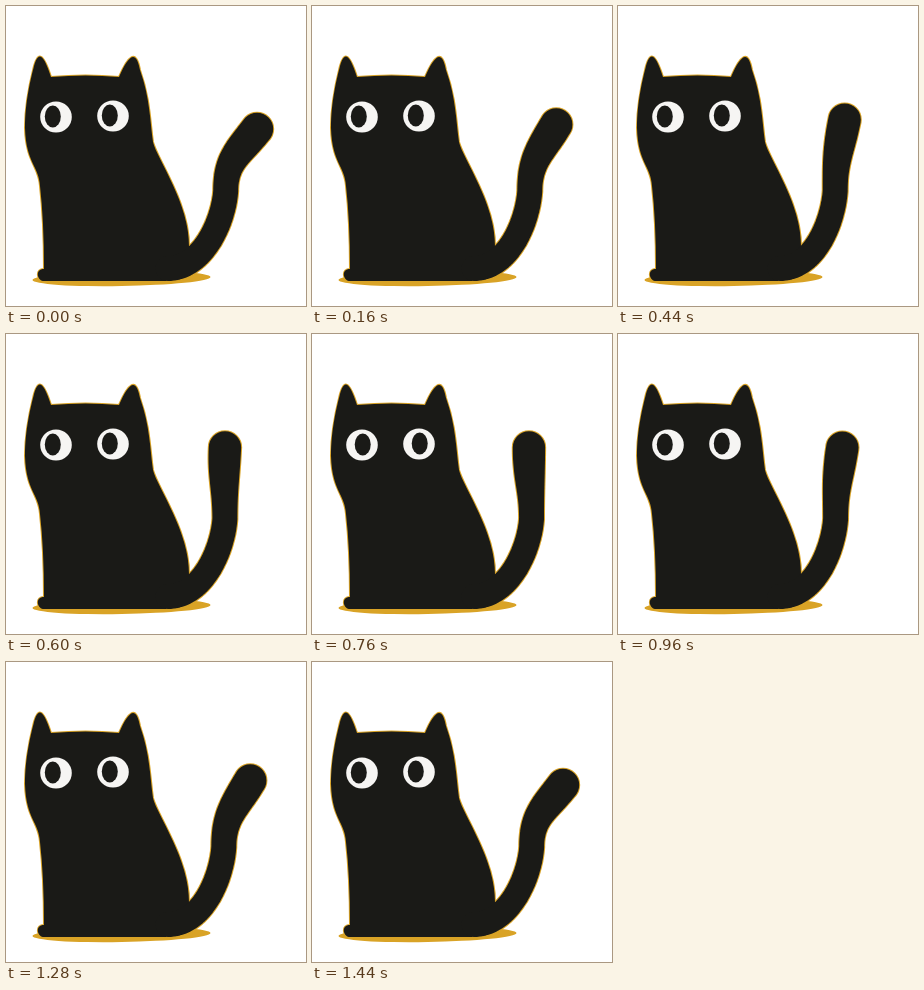
An HTML page with a canvas that plays this animation: 300 px wide and 300 px high, repeating every 1.48 s.

```html
<!DOCTYPE html>
<html lang="en">
<head>
<meta charset="utf-8">
<title>Black cat</title>
<style>
  html, body { margin: 0; width: 100%; height: 100%; overflow: hidden; background: #fff; }
  canvas { display: block; width: 300px; height: 300px; }
</style>
</head>
<body>
<canvas id="stage" width="300" height="300"></canvas>
<script>
const ctx = document.getElementById('stage').getContext('2d');
const BLACK = '#1a1a17', GOLD = '#d9a326', EYE = '#f6f5f3';
const LOOP = 1480, STEP = 40, TURN = 720;

const body = new Path2D(`M38 263 Q38 215 34 180 C33 160 20 157 19 122
  C19 95 25 72 28 60 C32 46 37 46 45 71 Q80 68 113 71
  C122 50 130 42 134 64 C144 92 144 115 147 136 C151 153 184 198 183 241
  L160 275 H37 C31 274 29 263 38 263 Z`);

// 1 with the tail out to the right, 0 when it stands upright.
function swing(t) {
  const u = Math.abs(t - TURN) / TURN, w = 2.8;
  return 0.85 * (1 - Math.cos(w * u)) / (1 - Math.cos(w)) + 0.15 * u;
}

// Sideways shift of the pupils.
function glance(t) {
  const d = Math.min(Math.abs(t - 775) / 175, 1);
  return 2 * (1 + Math.cos(d * Math.PI));
}

function bezier(a, b, c, d, u) {
  const v = 1 - u;
  const mix = i => v * v * v * a[i] + 3 * v * v * u * b[i] + 3 * v * u * u * c[i] + u * u * u * d[i];
  return [mix(0), mix(1)];
}

// Overlapping discs along a bent centreline, swelling towards the tip.
function tailPath(s) {
  const lean = 38 * s * Math.PI / 180;
  const root = [162, 262.5];
  const mid = [219.7 - 12 * s * (1 - s), 185];
  const tip = [216.5 + 34.5 * s, 113.5 + 9.5 * s ** 3];
  const lower = [root, [197, 262], [mid[0] - 2, 215], mid];
  const upper = [mid, [mid[0], 155],
    [tip[0] - 30 * Math.sin(lean), tip[1] + 30 * Math.cos(lean)], tip];

  const path = new Path2D(), count = 160;
  for (let i = 0; i <= count; i++) {
    const u = 2 * i / count;
    const [x, y] = u < 1 ? bezier(...lower, u) : bezier(...upper, u - 1);
    const swell = Math.max(u - 1, 0);
    const r = 12.5 + 3.7 * swell * swell * (3 - 2 * swell);
    path.moveTo(x + r, y);
    path.arc(x, y, r, 0, Math.PI * 2);
  }
  return path;
}

function ellipse(x, y, rx, ry, color, turn = 0) {
  ctx.fillStyle = color;
  ctx.beginPath();
  ctx.ellipse(x, y, rx, ry, turn, 0, Math.PI * 2);
  ctx.fill();
}

function eye(x, y, look) {
  ellipse(x, y, 15.8, 15.5, EYE);
  ellipse(x - 3.2 + look, y - 0.5, 8, 11, BLACK);
}

function draw(t) {
  ctx.fillStyle = '#fff';
  ctx.fillRect(0, 0, 300, 300);
  ellipse(115.5, 272.5, 89, 7.5, GOLD, -0.018);

  const shapes = [body, tailPath(swing(t))];
  ctx.strokeStyle = GOLD;
  ctx.lineWidth = 2;
  ctx.lineJoin = 'round';
  shapes.forEach(shape => ctx.stroke(shape));
  ctx.fillStyle = BLACK;
  shapes.forEach(shape => ctx.fill(shape));

  const look = glance(t);
  eye(50, 111, look);
  eye(107, 110, look);
}

function tick() {
  const t = performance.now() % LOOP;
  draw(Math.floor(t / STEP) * STEP);
  requestAnimationFrame(tick);
}
tick();
</script>
</body>
</html>
```
